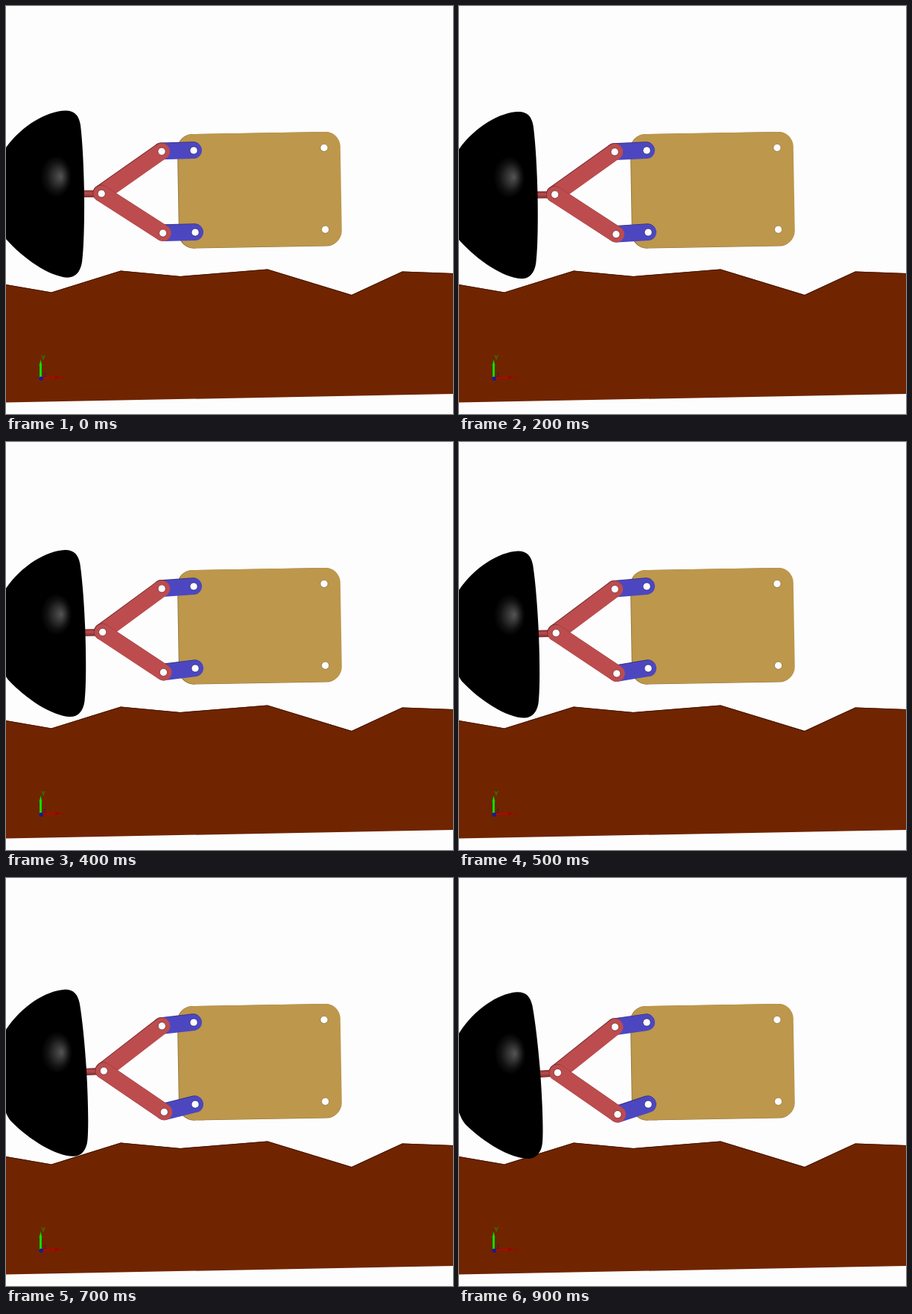
An HTML page that plays this animation: 600x548 px, repeating every 1000 ms.

```html
<!DOCTYPE html>
<html lang="en">
<head>
<meta charset="utf-8">
<title>Linkage over terrain</title>
<style>
  html, body { margin: 0; width: 100%; height: 100%; overflow: hidden; background: #fefdfe; }
  svg { display: block; width: 600px; height: 548px; }
  text { font-family: "Liberation Sans", Arial, sans-serif; }
  .link { stroke-linecap: round; fill: none; }
</style>
</head>
<body>
<svg viewBox="0 0 600 548">
  <defs>
    <radialGradient id="gloss" cx=".5" cy=".5" r=".5" fx=".66" fy=".5">
      <stop offset="0" stop-color="#555"/>
      <stop offset=".35" stop-color="#333"/>
      <stop offset=".7" stop-color="#111"/>
      <stop offset="1" stop-color="#000"/>
    </radialGradient>
    <linearGradient id="rod" x1="0" y1="0" x2="0" y2="1">
      <stop offset="0" stop-color="#7c3032"/>
      <stop offset=".4" stop-color="#bd4c4e"/>
      <stop offset="1" stop-color="#7c3032"/>
    </linearGradient>
  </defs>

  <g id="terrain">
    <path fill="#702500" d="M0 374 61 384.5 154 355.5 234 363 351 353.5 464 388 532 356.5 600 359V521L0 532.5Z"/>
    <path fill="none" stroke="#4a1800" stroke-width="1.2" d="M0 374.5 61 385 154 356 234 363.5 351 354 464 388.5 532 357 600 359.5"/>
  </g>

  <g id="plate" transform="rotate(-1 340.6 247)">
    <rect x="230.9" y="170.5" width="218" height="153.6" rx="20" fill="#8f7238"/>
    <rect x="231.8" y="170.5" width="218" height="153" rx="20" fill="#bd974b"/>
  </g>

  <g id="dish">
    <rect x="98" y="247.5" width="26" height="9.5" fill="url(#rod)"/>
    <path d="M80 140.5C92 140.5 98 147 100 160C103 185 104.5 220 105 252C105.3 290 104.5 325 102 344C100 357 93 365 82 364.7C58 363 24 340 0 313C-17 291 -17 213 0 190C22 160 55 141 80 140.5Z"/>
  </g>
  <ellipse id="shine" rx="21" ry="28" fill="url(#gloss)"/>

  <g id="links"></g>
  <g id="holes" fill="#fefdfe" stroke-width=".8"></g>

  <g id="axes">
    <path d="M47 500 69 499" stroke="#c00000" stroke-width="2"/>
    <path d="M66 496.8 74 498.8 66 501.2Z" fill="#a00000"/>
    <path d="M46.5 500V482" stroke="#00e000" stroke-width="3"/>
    <path d="M44.5 483 46.5 475 48.5 483Z" fill="#00e000"/>
    <circle cx="47.2" cy="500.5" r="2.8" fill="#1a1a90"/>
    <text x="47" y="474.5" font-size="9" fill="#00b000">Y</text>
    <text x="74" y="501.5" font-size="8" fill="#a80000">X</text>
    <text x="50" y="498" font-size="7" fill="#301460">Z</text>
  </g>
</svg>
<script>
const NS = "http://www.w3.org/2000/svg";
const STEP = 100, STEPS = 10, TILT = -3.6;
const RED = ["#bd4c4e", "#762e30"], BLUE = ["#4c47c0", "#2f2b78"];
const $ = id => document.getElementById(id);

function add(parent, tag, attrs) {
  const el = document.createElementNS(NS, tag);
  parent.appendChild(el);
  return set(el, attrs);
}
function set(el, attrs) {
  for (const k in attrs) el.setAttribute(k, attrs[k]);
  return el;
}

// A link is a round-ended bar with a thin shaded side.
function makeLink([face, side]) {
  const bar = (stroke, shift) => add($("links"), "line", {
    class: "link", stroke, "stroke-width": 22,
    transform: `translate(${-shift} ${-shift})`
  });
  const bars = [bar(side, 0.7), bar(face, 0)];
  return (a, b) => bars.forEach(el =>
    set(el, { x1: a[0], y1: a[1], x2: b[0], y2: b[1] }));
}
function makeHole(stroke) {
  const el = add($("holes"), "circle", { r: 5.1, stroke });
  return p => set(el, { cx: p[0], cy: p[1] });
}

const topPin = [252, 194], lowPin = [254, 304];
const upperBlue = makeLink(BLUE), lowerBlue = makeLink(BLUE);
const upperRed = makeLink(RED), lowerRed = makeLink(RED);
const [apexHole, topHole, lowHole] = [0, 1, 2].map(() => makeHole(RED[1]));
[topPin, lowPin].forEach(p => makeHole(BLUE[1])(p));
[[427, 190.4], [428.6, 300.2]].forEach(p => makeHole("#8f7238")(p));

const lerp = (a, b, s) => a.map((v, i) => v + (b[i] - v) * s);

// Speeds up over the first four steps, then moves evenly.
const progress = k => k < 4 ? 0.35 * (k / 4) ** 1.45 : 0.35 + 0.13 * (k - 4);

function draw(time) {
  const s = progress(Math.floor(time / STEP) % STEPS);
  const apex = lerp([128.2, 252], [132.4, 261.5], s);
  const top = lerp([209, 195.3], [209.4, 200], s);
  const low = lerp([210.6, 305], [212.9, 317.5], s);
  const shine = lerp([67, 229], [68.5, 236], s);

  set($("dish"), {
    transform: `translate(${apex}) rotate(${TILT * s}) translate(-128.2 -252)`
  });
  set($("shine"), { cx: shine[0], cy: shine[1] });
  upperBlue(top, topPin);
  lowerBlue(low, lowPin);
  upperRed(apex, top);
  lowerRed(apex, low);
  apexHole(apex);
  topHole(top);
  lowHole(low);
}

function tick() {
  draw(performance.now());
  requestAnimationFrame(tick);
}
tick();
</script>
</body>
</html>
```
